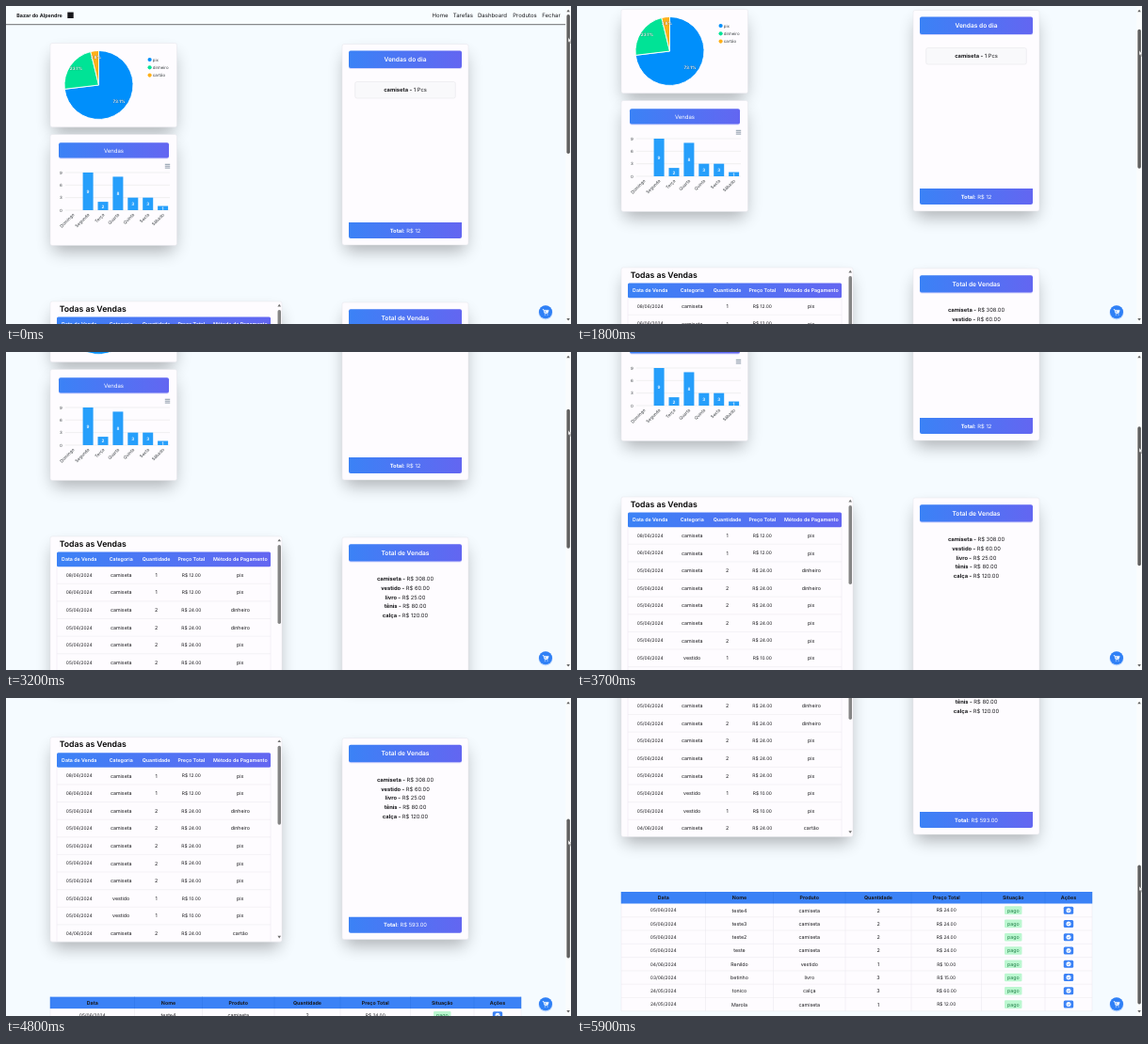
Animation of 600x338 px, one loop 6000 ms. Source, as an HTML page:

```html
<!DOCTYPE html>
<html lang="pt-BR">
<head>
<meta charset="utf-8">
<title>Painel de vendas</title>
<style>
  html, body { margin: 0; width: 100%; height: 100%; overflow: hidden; background: #f5fbff; }
  svg { display: block; width: 600px; height: 338px; }
  text { font-family: Inter, sans-serif; text-rendering: geometricPrecision; white-space: pre; }
  .shadow { filter: blur(9px); opacity: .3; }
</style>
</head>
<body>
<svg id="stage" viewBox="0 0 600 338">
  <defs>
    <linearGradient id="accent"><stop stop-color="#3b82f6"/><stop offset="1" stop-color="#6366f1"/></linearGradient>
  </defs>
  <g id="page"></g>
  <g id="fab">
    <circle cx="573" cy="325.8" r="7.6" fill="#3b82f6" opacity=".25"/>
    <circle cx="573" cy="325.3" r="7" fill="#2f80f6"/>
    <path d="M569.8 322.6h1.2l1 4h3.4M571.3 323.4h4.9l-.7 2.4h-3.6z" fill="#fff" stroke="#fff" stroke-width=".6"/>
    <circle cx="572.4" cy="328" r=".6" fill="#fff"/><circle cx="575" cy="328" r=".6" fill="#fff"/>
  </g>
  <rect x="594.3" width="5.7" height="338" fill="#fafcfd"/>
  <path d="M595.3 6.3l1.8-2.6 1.8 2.6zM595.3 331.9l1.8 2.6 1.8-2.6z" fill="#606060"/>
  <rect id="thumb" x="595.4" y="9" width="3.5" height="148" rx="1.75" fill="#606060"/>
  <path id="cursor" d="M597 0v5.2l1.2-1 .9 1.9.8-.4-.8-1.8h1.6z" fill="#fff" stroke="#555" stroke-width=".4"/>
</svg>
<script>
const WHITE = '#fff', INK = '#18181b', BLUE = '#3b82f6', ACCENT = 'url(#accent)', CARD = '#fefcff';

const rect = (x, y, w, h, fill, r = 0, extra = '') =>
  `<rect x="${x}" y="${y}" width="${w}" height="${h}" rx="${r}" fill="${fill}" ${extra}/>`;
const line = (d, color = '#e8e6ec', width = .5) =>
  `<path d="${d}" fill="none" stroke="${color}" stroke-width="${width}"/>`;
const circle = (x, y, r, fill) => `<circle cx="${x}" cy="${y}" r="${r}" fill="${fill}"/>`;
const text = (x, y, str, size, { fill = INK, weight = 400, anchor = 'middle', extra = '' } = {}) =>
  `<text x="${x}" y="${y + size * .36}" font-size="${size}" font-weight="${weight}" fill="${fill}" text-anchor="${anchor}" ${extra}>${str}</text>`;
const bold = str => `<tspan font-weight="700">${str}</tspan>`;
const cell = (x, y, str) => text(x, y, str, /\d{2}/.test(str) ? 4.9 : 5.3);

const card = (x, y, w, h) =>
  rect(x + 3, y + 12, w - 6, h - 6, '#000', 3, 'class="shadow"') +
  rect(x, y, w, h, CARD, 2, 'stroke="#e4e4ea" stroke-width=".5"');
const banner = (x, y, w, h, str, size, weight) =>
  rect(x, y + 1, w, h, '#6366f1', 2, 'opacity=".25"') + rect(x, y, w, h, ACCENT, 2) +
  text(x + w / 2, y + h / 2, str, size, { fill: WHITE, weight });
const footer = (y, total) =>
  `<path d="M364 ${y}h120v15q0 2-2 2h-116q-2 0-2-2z" fill="${ACCENT}"/>` +
  text(424, y + 8.5, `${bold('Total:')} R$ ${total}`, 5.8, { fill: WHITE });

function header() {
  const links = [[461, 'Home'], [485.3, 'Tarefas'], [516.5, 'Dashboard'], [551, 'Produtos'], [579, 'Fechar']];
  return rect(0, 0, 594.3, 19.5, '#f8fdff') + line('M0 19.7H594.3', '#333', .7) +
    text(11.3, 9.7, 'Bazar do Alpendre', 5.4, { weight: 700, anchor: 'start' }) +
    rect(65.3, 6.6, 6.4, 6.4, INK) +
    links.map(([x, label]) => text(x, 9.7, label, 6)).join('');
}

function pieCard() {
  const cx = 98.5, cy = 84, radius = 36.5;
  const slices = [[.731, '#008ffb', 'pix', 120, 101.5], [.231, '#00e396', 'dinheiro', 74.5, 66], [.038, '#feb019', 'cartão', 95.3, 54]];
  const point = f => [cx + radius * Math.sin(f * 2 * Math.PI), cy - radius * Math.cos(f * 2 * Math.PI)];
  let from = 0, out = card(47, 39.5, 134.5, 89.3), labels = '';
  slices.forEach(([share, color, name, x, y], i) => {
    const to = from + share;
    out += `<path d="M${cx} ${cy}L${point(from)}A${radius} ${radius} 0 ${+(share > .5)} 1 ${point(to)}z" fill="${color}" stroke="#fff" stroke-width=".9"/>`;
    labels += text(x, y, (share * 100).toFixed(1) + '%', 4.6, { fill: WHITE, weight: 600, extra: 'stroke="#0004" stroke-width=".5" paint-order="stroke"' }) +
      circle(152.6, 57 + i * 8.3, 2.1, color) +
      text(155.8, 57 + i * 8.3, name, 4.4, { fill: '#373d3f', anchor: 'start' });
    from = to;
  });
  return out + labels;
}

function barCard() {
  const days = [['Domingo', 0], ['Segunda', 9], ['Terça', 2], ['Quarta', 8], ['Quinta', 3], ['Sexta', 3], ['Sábado', 1]];
  let out = card(47, 136.5, 134.5, 118) + banner(56, 145.3, 117, 16.2, 'Vendas', 6, 400);
  out += line('M168.8 168.3h5.4m-5.4 1.9h5.4m-5.4 1.9h5.4', '#6e8192', .8);
  for (let v = 0; v <= 9; v += 3) {
    const y = 217 - v * 40 / 9;
    out += line(`M63 ${y}H174`, '#e0e0e0', .5) + text(58.3, y, v, 4.4, { fill: '#373d3f' });
  }
  days.forEach(([day, v], i) => {
    const x = 71.2 + i * 15.9, h = v * 40 / 9;
    if (v) out += rect(x - 5.5, 217 - h, 11, h, '#269ffb') + text(x, 217.3 - h / 2, v, 4.6, { fill: WHITE, weight: 600 });
    out += text(0, 0, day, 4.6, { fill: '#373d3f', anchor: 'end', extra: `transform="translate(${x + .6} 221) rotate(-45)"` });
  });
  return out;
}

const dayCard = () => card(357, 40.5, 134, 213.5) + banner(364, 47.6, 120, 18.4, 'Vendas do dia', 6.6, 600) +
  rect(370.7, 80.5, 106.6, 17.5, '#f9f9fb', 2, 'stroke="#e2e2e7" stroke-width=".5"') +
  text(424, 89, `${bold('camiseta -')} 1 Pcs`, 5.8) + footer(230, '12');

function totalCard() {
  const items = [['camiseta', 308], ['vestido', 60], ['livro', 25], ['tênis', 80], ['calça', 120]];
  return card(357, 315, 134, 214) + banner(364, 322.2, 120, 18.4, 'Total de Vendas', 6.6, 600) +
    items.map(([name, sum], i) => text(424, 359 + i * 9.8, `${bold(name + ' -')} R$ ${sum}.00`, 5.8)).join('') +
    footer(505, '593.00');
}

function salesCard() {
  const cols = [77.7, 122.2, 159.6, 196.8, 248.8];
  const titles = ['Data de Venda', 'Categoria', 'Quantidade', 'Preço Total', 'Método de Pagamento'];
  const shirt = (day, qty, method) => [day, 'camiseta', qty, qty * 12, method];
  const dress = ['05', 'vestido', 1, 10, 'pix'];
  const rows = [shirt('08', 1, 'pix'), shirt('06', 1, 'pix'), shirt('05', 2, 'dinheiro'), shirt('05', 2, 'dinheiro'),
    shirt('05', 2, 'pix'), shirt('05', 2, 'pix'), shirt('05', 2, 'pix'), dress, dress, shirt('04', 2, 'cartão')];
  let out = card(47, 314, 246, 217.5) + text(56.7, 321.6, 'Todas as Vendas', 8.7, { weight: 600, anchor: 'start', fill: '#000' });
  out += rect(54, 330.5, 227, 15.7, ACCENT, 1.5) + line('M54 346V531M281 346V531');
  out += titles.map((title, i) => text(cols[i], 338.2, title, 5.3, { fill: WHITE, weight: 600 })).join('');
  rows.forEach(([day, name, qty, price, method], r) => {
    const y = 355 + r * 18.62;
    [day + '/06/2024', name, qty, `R$ ${price}.00`, method].forEach((value, i) => out += cell(cols[i], y, value));
    if (r < 9) out += line(`M54 ${y + 9.3}h227`);
  });
  return out + rect(288.5, 323, 3.5, 84, '#858585', 1.75) +
    `<path d="M288.4 319.4l1.8-2.6 1.8 2.6zM288.4 525.2l1.8 2.6 1.8-2.6z" fill="#707070"/>`;
}

function ordersTable() {
  const edges = [47, 136.5, 208.5, 285, 355, 429.5, 497, 547];
  const mid = i => (edges[i] + edges[i + 1]) / 2;
  const titles = ['Data', 'Nome', 'Produto', 'Quantidade', 'Preço Total', 'Situação', 'Ações'];
  const rows = [
    ...['teste4', 'teste3', 'teste2', 'teste'].map(name => ['05/06', name, 'camiseta', 2, 24]),
    ['04/06', 'Renildo', 'vestido', 1, 10], ['03/06', 'betinho', 'livro', 3, 15],
    ['24/05', 'tonico', 'calça', 3, 60], ['24/05', 'Marola', 'camiseta', 1, 12]];
  const top = 602.5, step = 14.28, height = rows.length * step;
  let out = rect(47, top, 500, height, CARD) + rect(47, 590, 500, 12.5, BLUE);
  out += titles.map((title, i) => text(mid(i), 596.2, title, 5.3, { weight: 700 })).join('');
  out += edges.map(x => line(`M${x} ${top}v${height}`) + line(`M${x} 590v12.5`, '#2f74e6')).join('');
  rows.forEach(([date, name, product, qty, price], r) => {
    const y = top + (r + .5) * step, x = mid(6);
    [date + '/2024', name, product, qty, `R$ ${price}.00`].forEach((value, i) => out += cell(mid(i), y, value));
    out += line(`M47 ${y + step / 2}h500`) +
      rect(mid(5) - 9.2, y - 4.3, 18.4, 8.6, '#bbf7d0', 1) + text(mid(5), y, 'pago', 5.3, { fill: '#22804a' }) +
      rect(x - 5.2, y - 4, 10.4, 8, BLUE, 1.5) + circle(x, y, 2.5, WHITE) +
      line(`M${x - 1.2} ${y}l.9 .9 1.6-1.7`, BLUE, .7);
  });
  return out;
}

const el = id => document.getElementById(id);
el('page').innerHTML = [header, pieCard, barCard, dayCard, salesCard, totalCard, ordersTable].map(part => part()).join('');

// Scroll position over time, joined by a smooth cubic curve
const KEYS = [[600, 0], [1800, 36], [2700, 81], [3700, 160], [4300, 217], [5200, 316.4], [5900, 384]];
function slope(i) {
  if (i === 0) return .012;
  const [t0, s0] = KEYS[i - 1], [t1, s1] = KEYS[Math.min(i + 1, KEYS.length - 1)];
  return (s1 - s0) / (t1 - t0);
}
function scrollAt(t) {
  if (t <= KEYS[0][0]) return 0;
  const i = Math.max(0, KEYS.findIndex(key => t <= key[0]) - 1);
  const [t0, s0] = KEYS[i], [t1, s1] = KEYS[i + 1];
  const span = t1 - t0, u = (t - t0) / span, v = 1 - u;
  return s0 * v * v * (1 + 2 * u) + s1 * u * u * (3 - 2 * u) + span * u * v * (slope(i) * v - slope(i + 1) * u);
}

const start = performance.now();
function draw() {
  const t = Math.floor((performance.now() - start) % 6000 / 100) * 100;
  const scroll = scrollAt(t), thumbY = scroll * .439;
  el('page').setAttribute('transform', `translate(0 ${-scroll})`);
  el('thumb').setAttribute('transform', `translate(0 ${thumbY})`);
  el('cursor').setAttribute('transform', `translate(0 ${31.5 + thumbY + Math.max(0, 2 - t / 100)})`);
  requestAnimationFrame(draw);
}
draw();
</script>
</body>
</html>
```
